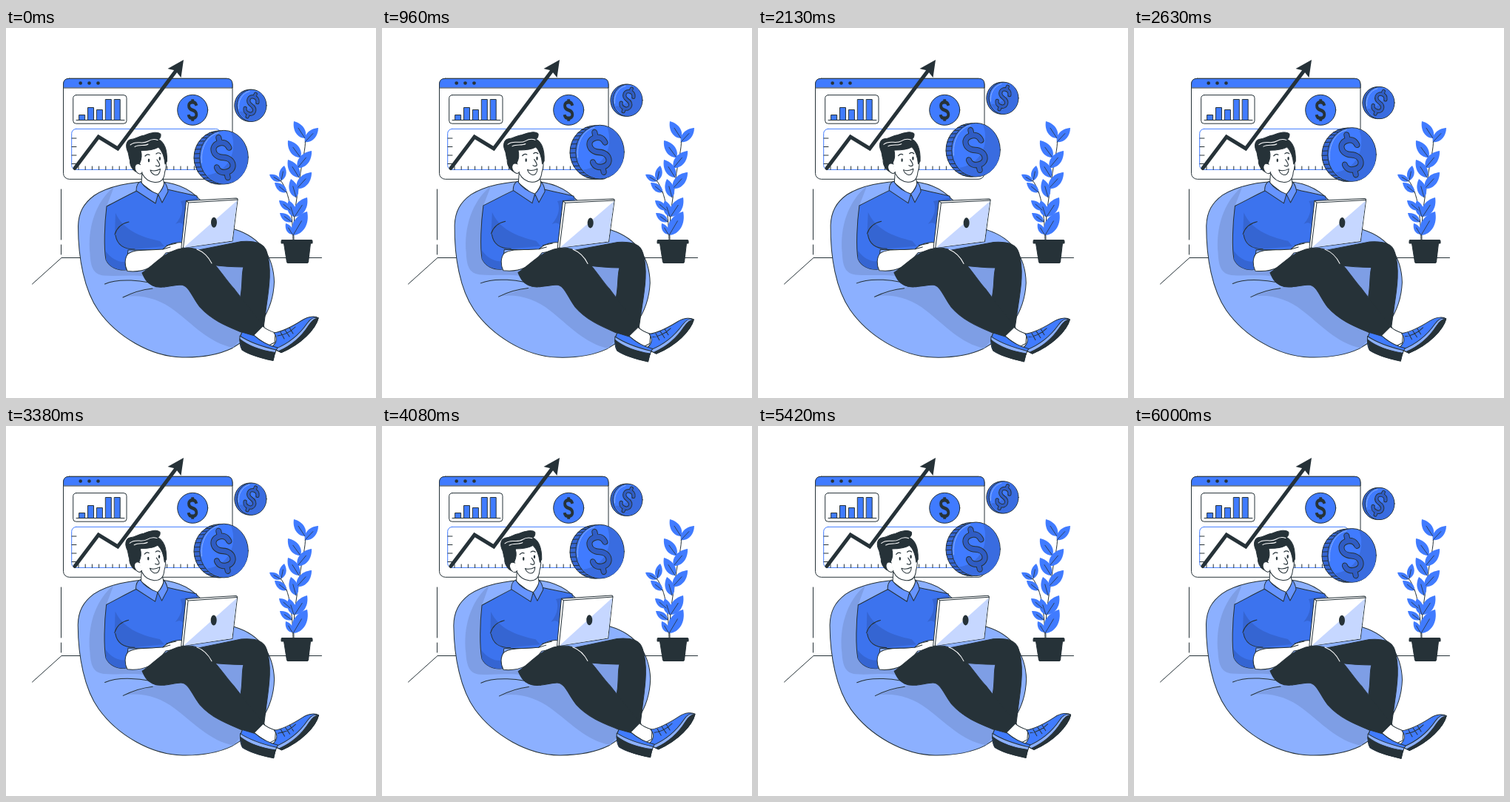
Recreate the animation shown at these times as an HTML page. Size 500 by 500 pixels, loop 6.04 s.

```html
<!DOCTYPE html>
<html lang="en">
<head>
<meta charset="utf-8">
<title>Investor at home</title>
<style>
  html, body { margin: 0; width: 100%; height: 100%; overflow: hidden; background: #fff; }
  svg { display: block; width: 100%; height: 100%; }
  .ink { fill: none; stroke: #263238; stroke-width: 1; stroke-linecap: round; stroke-linejoin: round; }
  .blue { fill: #407bff; }
  .white { fill: #fff; }
  .bag { fill: #8cb0ff; }
  .bagShade { fill: #7e9ee5; stroke: none; }
  .shirt { fill: #3c73ee; }
  .shirtShade { fill: #3565d2; stroke: none; }
  .coinShade { fill: #396ce0; stroke: none; }
  .shine { stroke: #8cb0ff; }
  .dark { fill: #263238; }
  .collar { fill: #6694ff; }
</style>
</head>
<body>
<svg viewBox="0 0 500 500" class="ink">
  <defs>
    <path id="dollar" d="M7 -7C6 -11 3 -12.500 0 -12.500C-9 -12.500 -9.500 -2.500 0 0C9.500 2.500 9 12.500 0 12.500C-4 12.500 -7 10.500 -7.500 7M0 -17V-12.500M0 12.500V17"/>
  </defs>

  <!-- room -->
  <path d="M74.500 218V286M74.500 293V306M35.500 346L75 310.500H426.500"/>

  <!-- browser window -->
  <rect class="white" x="77.500" y="68.300" width="228.500" height="136" rx="8"/>
  <path class="blue" d="M77.500 80.600V76Q77.500 68.300 85 68.300H298.500Q306 68.300 306 76V80.600Z"/>
  <g class="dark" stroke="none">
    <circle cx="100.700" cy="74.500" r="2.300"/><circle cx="112.500" cy="74.500" r="2.300"/><circle cx="124.500" cy="74.500" r="2.300"/>
  </g>
  <rect class="white" x="90.700" y="90.600" width="72.300" height="38.600" rx="4"/>
  <g id="bars" class="blue"></g>
  <path d="M95 124.500H160"/>
  <rect x="88.700" y="136.400" width="201" height="55" rx="6" stroke="#407bff"/>
  <path id="ticks"/>
  <path d="M93 189.500L125 147L151 163L231 56" stroke-width="5" stroke-linejoin="miter"/>
  <path class="dark" stroke="none" d="M240 43L218.500 55L229 57.500L236.500 67Z"/>
  <circle class="blue" cx="252.200" cy="110.800" r="20.500"/>
  <use href="#dollar" transform="translate(252.200 111) scale(.74 .87)" stroke-width="5.200" stroke-linecap="butt"/>

  <!-- plant -->
  <path d="M389 287C387 255 395 222 398 195C402 172 406 158 404 146M388 287C387 255 384 222 371 206"/>
  <g id="leaves" stroke-width=".8"></g>
  <path class="dark" d="M373 286.500H413Q414 286.500 414 288V291H411.500L408.500 316.500Q408.400 317.500 407 317.500H381Q379.600 317.500 379.500 316.500L375.500 291H372V288Q372 286.500 373 286.500Z"/>

  <!-- coins -->
  <g id="coins">
    <g>
      <ellipse fill="#3565d2" cx="329.500" cy="104.800" rx="20.700" ry="21.600"/>
      <ellipse class="blue" cx="332" cy="104.800" rx="20" ry="21.600"/>
      <path class="coinShade" d="M340 85C349 90 352 99 351 109C348 121 339 127 328 125.500C321 122 317 118 315 113C333 112 341 100 340 85Z"/>
      <path class="shine" d="M314.500 109C313.500 98 319 88 329 85.500"/>
      <g transform="translate(331.700 104.500) rotate(20) scale(.9 .95)">
        <use href="#dollar" stroke-width="5.800"/>
        <use href="#dollar" stroke="#2f5cc4" stroke-width="3.700"/>
      </g>
    </g>
    <g>
      <ellipse fill="#3565d2" cx="288.500" cy="175" rx="34.500" ry="36.200"/>
      <path id="ribs"/>
      <ellipse class="blue" cx="294.500" cy="174.700" rx="32.800" ry="36.300"/>
      <path class="coinShade" d="M304 140.500C322 147 330 168 325.500 187C319 205 306 212 290 210.200C282 208 276 204 271.500 199C300 195 314 168 304 140.500Z"/>
      <path class="shine" d="M264.500 182C262.500 162 272 145 287 141.500"/>
      <g transform="translate(293.500 175) rotate(-13) scale(1.520 1.620)">
        <use href="#dollar" stroke-width="5.300"/>
        <use href="#dollar" stroke="#2f5cc4" stroke-width="4"/>
      </g>
    </g>
  </g>

  <!-- man on the bean bag -->
  <g id="rocker">
    <path class="bag" d="M97.500 268C98 249 105 237 119 226.500C138 214 168 207.500 200 207.500C228 207.500 248 217 262 232L309 272C345 283 361.500 310 362.500 343C361 385 337 415 305 433C285 442.500 262 445.500 238 445C195 444 150 417 125 382C106 355 97.500 312 97.500 268Z"/>
    <path class="bagShade" d="M146 214.500C120 236 110 272 113.500 305C114.500 325 119 333 132 334.500C150 336 172 333 188 336L184 320L138 312L136 241Z"/>
    <path class="bagShade" d="M158 363.500C182 359 208 366 228 382C252 400 275 426 307 432L325 411L240 345L205 349Z"/>
    <path class="bagShade" d="M276 319H324L322 372Z"/>
    <path d="M133.500 346C150 338.500 185 339 214 350M158 364C172 357 184 353.500 198 352"/>

    <!-- torso -->
    <path class="shirt" d="M136 241C150 234 164 226 178 219.500L215 217.500C235 222 250 225 258 227L260 240L240 300H165L162 327C149 328 139 322 135 313C132 297 133 265 136 241Z"/>
    <path class="shirtShade" d="M148 250C158 272 180 282 208 288L214 295L171 299C158 298 148 289 147 278Z"/>
    <path class="shirtShade" d="M258.500 229L236 234C240 241 239 254 229 265C237 261 241 264 241 276L246 236H260Z"/>
    <path class="shirtShade" d="M135 302C142 312 153 317 161 316L162 327C149 328 139 322 135 313Z"/>
    <path d="M147 279C150 269 157 264 166 262M148 280C150 293 160 299 174 299"/>
    <path class="white" d="M165 305C174 299 184 301 212 299C219 292 230 288.500 239 290V300L216 304C202 322 188 331 164 328.500C160 321 160 311 165 305Z"/>
    <path d="M212 299L222 296M217 294L230 291"/>

    <!-- neck, collar, head -->
    <path class="white" d="M184 192L183 210L205 227L214 212L211 198Z"/>
    <path class="collar" d="M182 207.500C178 209 176 214 176 220L202 237L205.500 224.500C196 221 187 215 183 209Z"/>
    <path class="collar" d="M214 208C217 212 218.500 216 219 221L211 236L205.500 224.500C210 220 213 215 214 208Z"/>
    <path class="white" d="M180 168C179 190 184 207 201 208.500C210 209 214 203 214.500 195C217 188 217 181 215 174L209 159L186 162Z"/>
    <path class="dark" d="M165 168C161 160 162 152 169 150.500C176 150 179 146 187 145C196 141 206 139.500 209 143.500C209.500 147 208 149 206 150.500C213 154 218 163 217.500 180L215 184C214 174 211 166 206 161C199 165 190 165.500 182 165.500C184 172 183 178 180.500 183C176 184 177 191 180 195.500C173 195 167 187 167.500 179C166 175 166 171 165 168Z"/>
    <path class="white" d="M181.500 184.500C175 181 172 188 176 194C179 198 183 198 184 195"/>
    <path stroke="#fff" d="M168 158C176 151 184 158 192 153C197 150 201 150 205 151.500M174 160.500C180 157 187 160 192 157"/>
    <path d="M188 173Q191 169.500 194 171.500M203 170Q206 167.500 209 170M204 178C206 181 208.500 184 207.500 186Q205.500 188 202.500 186" stroke-width="1.200"/>
    <ellipse class="dark" cx="193" cy="179" rx="1.200" ry="2.400" stroke="none"/>
    <ellipse class="dark" cx="207.800" cy="176.500" rx="1.200" ry="2.400" stroke="none"/>
    <path class="white" d="M195 192C200 194 204 193 208.500 190.500C208 197 205 199.500 201 198.500C198 197.500 196 195 195 192Z"/>

    <!-- legs -->
    <path class="dark" d="M255 301L318 288.500C338 287 349 291 352.500 303C359 324 356 348 352 375L348 405L328 404L317 362C320 345 318 333 321 323C306 323 292 322 276 320Z"/>
    <path class="dark" d="M184 331C200 320 212 305 232 299C244 296 256 297 264 302C286 320 294 337 308 352C320 368 331 381 349 404L336 416L318 411C299 403 278 395 262 377C251 363 247 347 236 347C222 348 208 353 198 348C190 344 187 338 184 331Z"/>
    <path stroke="#fff" d="M258 299C268 303 274 310 278 318"/>

    <!-- shoes -->
    <path class="white" d="M347 403C352 408 358 410 364 412L363 425L355 429C347 424 340 420 335 415Z"/>
    <path class="blue" d="M362 412C376 410 389 402 400 395C409 389 419 389 422 392C419 405 400 426 372 438.500L358 432C367 425 367 418 362 412Z"/>
    <path class="bag" d="M422 391.500C415 390 411 393 407 399C396 415 383 426 363 434L372 438.500C399 427 418 407 422 392Z"/>
    <path class="dark" d="M422 392C417 392 413 396 409 402C400 416 388 428 369 436.500L372 438.500C399 427 418 407 422 392Z"/>
    <path d="M371 411L376 420M377 408L383 417M383 405L388 413M367 416C376 415 385 410 391 404"/>
    <path class="blue" d="M319 411L336 416C345 424 355 429 367 432L364 437L361 449C345 446 328 441 319 435C315 428 315 418 319 411Z"/>
    <path class="bag" d="M316 416C328 424 348 431 365 435L363.500 440C345 437 328 431 316 423Z"/>
    <path class="dark" d="M316 420.500C328 430 346 436 363.500 438.500L361 449.500C345 446 328 441 319 434Z"/>

    <!-- laptop -->
    <path class="white" d="M243.500 233.500L311 230Q313.500 230 313 232.500L306 288L236.800 297.500Z"/>
    <path fill="#c6d7ff" stroke="none" d="M312.500 233L305.500 287.500L240 297Z"/>
    <path d="M246.500 236L313 232M246.500 236L239.500 297M243.500 233.500L246.500 236"/>
    <ellipse class="dark" cx="281" cy="262.800" rx="4" ry="7" stroke="none"/>
  </g>
</svg>
<script>
  const LOOP = 6040;
  const FLOATS = 4;
  const TAU = Math.PI * 2;
  const byId = id => document.getElementById(id);

  byId('bars').innerHTML = [7, 17, 14, 28, 28].map((h, i) =>
    `<rect x="${99 + i * 11.9}" y="${124.5 - h}" width="7.600" height="${h}"/>`).join('');

  let ticks = '';
  for (let x = 98; x < 260; x += 9.2) ticks += `M${x} 187V191.500`;
  for (let y = 149; y < 190; y += 11.5) ticks += `M89 ${y}H95`;
  byId('ticks').setAttribute('d', ticks);

  let ribs = '';
  for (let a = 1.75; a < 4.4; a += 0.17) {
    const c = Math.cos(a), s = Math.sin(a);
    ribs += `M${288.5 + 34.5 * c} ${175 + 36.2 * s}L${294.5 + 32.8 * c} ${174.7 + 36.3 * s}`;
  }
  byId('ribs').setAttribute('d', ribs);

  // A slim leaf from its base on the stem to its tip, with a vein over the lower part.
  function leaf([bx, by, tx, ty]) {
    const dx = tx - bx, dy = ty - by;
    const at = (along, side) => `${bx + dx * along - dy * side} ${by + dy * along + dx * side}`;
    return `<path class="blue" stroke="none" d="M${bx} ${by}C${at(0.2, 0.3)} ${at(0.65, 0.32)} ${tx} ${ty}C${at(0.65, -0.32)} ${at(0.2, -0.3)} ${bx} ${by}"/>
      <path d="M${bx} ${by}L${at(0.6, 0)}"/>`;
  }
  byId('leaves').innerHTML = [
    [404, 149, 389, 126], [404, 154, 422, 135], [398, 175, 381, 152],
    [394, 189, 413, 166], [396, 202, 381, 178], [393, 217, 413, 195],
    [392, 229, 385, 204], [390, 255, 407, 229], [389, 255, 382, 233],
    [388, 280, 407, 248], [387, 279, 378, 264],
    [371, 207, 356, 198], [372, 206, 376, 186], [379, 222, 363, 209],
    [384, 246, 369, 233], [386, 262, 370, 250]
  ].map(leaf).join('');

  function draw(now) {
    const turn = (now % LOOP) / LOOP * TAU;
    const lift = -5.2 * (0.96 - Math.cos(turn * FLOATS + 0.29));
    byId('coins').setAttribute('transform', `translate(0 ${lift.toFixed(3)})`);
    byId('rocker').setAttribute('transform', `rotate(${(0.8 * Math.sin(turn)).toFixed(4)} 231 322)`);
  }

  const start = performance.now();
  function tick() {
    draw(performance.now() - start);
    requestAnimationFrame(tick);
  }
  tick();
</script>
</body>
</html>
```
